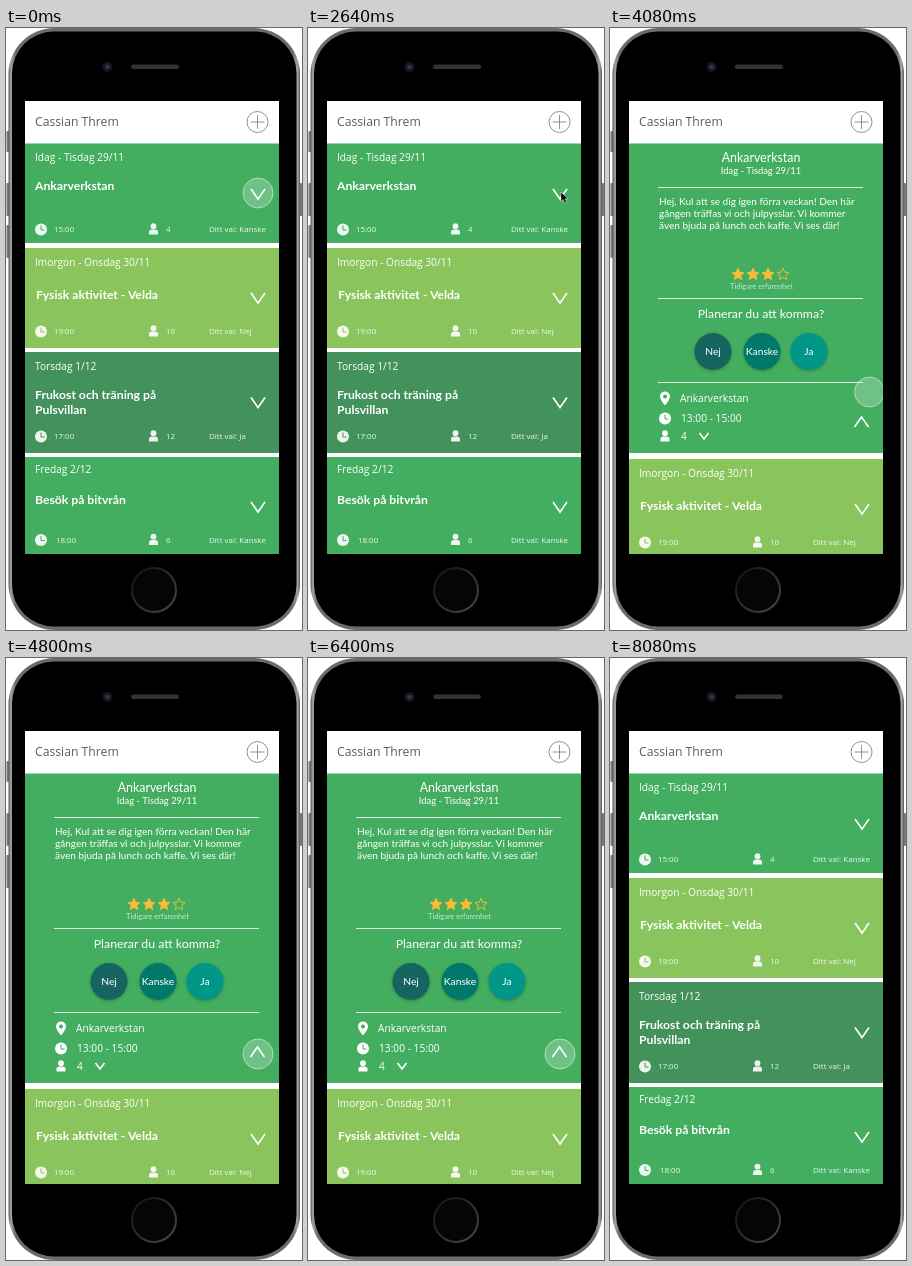
Recreate the animation shown at these times as an HTML page. Size 296 px wide and 602 px high, loop 8.24 s.

```html
<!DOCTYPE html>
<html lang="sv">
<head>
<meta charset="utf-8">
<style>
html, body { margin: 0; width: 100%; height: 100%; overflow: hidden; background: #fff }
svg { display: block; width: 296px; height: 602px }
text { fill: #fff; font-family: "Open Sans", sans-serif; white-space: pre }
.lato { font-family: Lato, sans-serif }
.bold { font-weight: 700 }
.mid { text-anchor: middle }
.line { fill: none; stroke: #fff }
.choice { filter: drop-shadow(0 1.5px 1.5px #0004) }
</style>
</head>
<body>
<svg viewBox="0 0 296 602">
  <defs>
    <clipPath id="screen"><rect x="19" y="73" width="254" height="453"/></clipPath>
    <linearGradient id="rim">
      <stop offset="0" stop-color="#55565b"/><stop offset=".008" stop-color="#a2a3a8"/>
      <stop offset=".025" stop-color="#6a6b70"/><stop offset=".975" stop-color="#6a6b70"/>
      <stop offset=".992" stop-color="#a2a3a8"/><stop offset="1" stop-color="#55565b"/>
    </linearGradient>
    <linearGradient id="ring" x2="1" y2="1">
      <stop offset="0" stop-color="#111"/><stop offset="1" stop-color="#4a4a4c"/>
    </linearGradient>
  </defs>
  <g fill="#77787d">
    <rect x=".5" y="103" width="3" height="21" rx="1"/>
    <rect x=".5" y="155" width="3" height="33" rx="1"/>
    <rect x=".5" y="197" width="3" height="33" rx="1"/>
    <rect x="293" y="155" width="3" height="33" rx="1"/>
  </g>
  <rect x="2.500" y="0" width="291.500" height="602" rx="46" fill="url(#rim)"/>
  <rect x="6" y="3.500" width="284.500" height="595" rx="42" fill="#000"/>
  <circle cx="101.500" cy="39" r="5" fill="#17171d"/>
  <circle cx="101.500" cy="39" r="2.300" fill="#30364f"/>
  <rect x="125" y="36.500" width="48" height="4.500" rx="2.250" fill="#333335"/>
  <circle cx="148" cy="562" r="22" fill="#050505" stroke="url(#ring)" stroke-width="2"/>
  <g clip-path="url(#screen)">
    <rect x="19" y="73" width="254" height="453" fill="#fff"/>
    <g id="cards"></g>
    <text x="29" y="98.300" font-size="12.200" style="fill:#5c5c5c">Cassian Threm</text>
    <g fill="none" stroke="#777" stroke-width=".8">
      <circle cx="251.500" cy="94" r="10.500"/>
      <path d="M244.500 94h14M251.500 87v14"/>
    </g>
    <circle id="touch" r="15" fill="#fff" fill-opacity=".24" stroke="#fff" stroke-opacity=".5"/>
    <path id="mouse" d="M253 164v9.500l2.200-2 1.700 3.500 1.800-.8-1.700-3.400h3z" fill="#000" stroke="#fff" stroke-width=".5"/>
  </g>
</svg>
<script>
const $ = id => document.getElementById(id);

const text = (x, y, size, str, cls = '', extra = '') =>
  `<text x="${x}" y="${y}" font-size="${size}" class="${cls}" ${extra}>${str}</text>`;
const chevron = (x, y, w = 7, h = 5) =>
  `<path class="line" stroke-width="1.6" d="M${x - w} ${y - h}L${x} ${y + h}L${x + w} ${y - h}"/>`;
const clock = (x, y, bg) =>
  `<circle cx="${x}" cy="${y}" r="6" fill="#fff"/><path d="M${x} ${y - 4}v4.5h3.5" fill="none" stroke="${bg}"/>`;
const person = (x, y) =>
  `<g fill="#fff"><circle cx="${x}" cy="${y - 2.8}" r="2.9"/>
   <path d="M${x - 4.5} ${y + 5.5}v-2.5q0-2.5 3-2.5h3q3 0 3 2.5v2.5z"/></g>`;
const rule = y => `<path class="line" stroke-opacity=".8" d="M48 ${y}H253"/>`;
const star = (x, y, fill) => {
  const pts = Array.from({length: 10}, (_, i) => {
    const a = i * Math.PI / 5, r = i % 2 ? 2.9 : 6.3;
    return [x + r * Math.sin(a), y - r * Math.cos(a)].map(v => v.toFixed(2));
  });
  return `<polygon points="${pts.join(' ')}" fill="${fill}" stroke="#fdbb36" stroke-width=".9"/>`;
};
const choice = (x, color, str) =>
  `<circle class="choice" cx="${x}" cy="323.5" r="18.5" fill="${color}"/>` + text(x, 327, 10.3, str, 'lato mid');

const cards = [
  {top: 115.5, h: 99.5, bg: '#43ae5f', date: 'Idag - Tisdag 29/11', dateY: 132.5, x: 29, title: ['Ankarverkstan'],
   titleY: 162, arrow: 166, foot: 201.5, time: '15:00', timeX: 48, n: 4, val: 'Kanske'},
  {top: 220, h: 100, bg: '#89c45d', date: 'Imorgon - Onsdag 30/11', dateY: 237.5, x: 30, title: ['Fysisk aktivitet - Velda'],
   titleY: 271, arrow: 270, foot: 303.5, time: '19:00', timeX: 48, n: 10, val: 'Nej'},
  {top: 324, h: 101, bg: '#44925b', date: 'Torsdag 1/12', dateY: 341.5, x: 29, title: ['Frukost och träning på', 'Pulsvillan'],
   titleY: 371, arrow: 374.5, foot: 408.5, time: '17:00', timeX: 48, n: 12, val: 'Ja'},
  {top: 429, h: 97, bg: '#43ae5f', date: 'Fredag 2/12', dateY: 444.5, x: 29, title: ['Besök på bitvrån'],
   titleY: 476, arrow: 479, foot: 512, time: '18:00', timeX: 50, n: 6, val: 'Kanske'}
];

const summary = c =>
  text(29, c.dateY, 10.2, c.date) +
  c.title.map((s, i) => text(c.x, c.titleY + i * 15, 12.2, s, 'lato bold')).join('') +
  chevron(252, c.arrow) + `<g opacity=".9">` +
  clock(35, c.foot, c.bg) + text(c.timeX, c.foot + 2.7, 7.9, c.time) +
  person(147.5, c.foot - .5) + text(160, c.foot + 2.7, 7.9, c.n) +
  text(203, c.foot + 2.7, 8, 'Ditt val: ' + c.val) + '</g>';

const details = () =>
  text(151, 133.5, 12.4, 'Ankarverkstan', 'lato mid') +
  text(151, 146, 9.4, 'Idag - Tisdag 29/11', 'lato mid') + rule(159.5) +
  ['Hej, Kul att se dig igen förra veckan! Den här',
   'gången träffas vi och julpysslar. Vi kommer',
   'även bjuda på lunch och kaffe. Vi ses där!']
    .map((s, i) => text(49, 176.5 + i * 12, 10.05, s, 'lato')).join('') +
  [128, 143, 158, 173].map((x, i) => star(x, 246.5, i < 3 ? '#fdbb36' : 'none')).join('') +
  text(151.5, 261, 7.5, 'Tidigare erfarenhet', 'lato mid', 'opacity=".7"') + rule(270.5) +
  text(151, 290, 12.3, 'Planerar du att komma?', 'lato mid') +
  choice(103, '#16645f', 'Nej') + choice(152, '#00796b', 'Kanske') + choice(199, '#009688', 'Ja') + rule(354.5) +
  `<path d="M55 377.5q-5-6-5-9a5 5 0 0 1 10 0q0 3-5 9zm0-11a2 2 0 1 0 .01 0z" fill="#fff" fill-rule="evenodd"/>` +
  text(70, 374, 10.2, 'Ankarverkstan') +
  clock(55, 390.5, '#43ae5f') + text(71, 394, 10.2, '13:00 - 15:00') +
  person(55, 408) + text(71, 411.5, 10.2, '4') + chevron(94, 408, 4.5, 3) + chevron(251.5, 394, 7, -5);

$('cards').innerHTML = cards.map((c, i) =>
  `<g id="card${i}"><rect id="back${i}" x="19" y="${c.top}" width="254" height="${c.h}" fill="${c.bg}"/>
   <g id="sum${i}">${summary(c)}</g></g>`).join('') + `<g id="details">${details()}</g>`;

const LOOP = 8240, STEP = 80, SHIFT = 211;
const clamp = v => Math.min(1, Math.max(0, v));
const easeOut = u => 1 - (1 - clamp(u)) ** 3;
const smooth = u => u * u * (3 - 2 * u);

// time, x, y of the finger
const path = [[0, 252, 165], [2640, 253.5, 165], [3440, 253.5, 165], [4080, 259.5, 364],
  [4720, 252, 396], [7080, 252, 396], [7480, 292, 400], [LOOP, 292, 400]];

function finger(t) {
  const i = path.findIndex(p => p[0] > t);
  const [t0, x0, y0] = path[i - 1], [t1, x1, y1] = path[i];
  const u = smooth((t - t0) / (t1 - t0));
  return [x0 + (x1 - x0) * u, y0 + (y1 - y0) * u];
}

function draw(t) {
  const open = easeOut((t - 2640) / 240) - easeOut((t - 6400) / 300);
  for (let i = 1; i < 4; i++) $('card' + i).setAttribute('transform', `translate(0 ${SHIFT * open})`);
  $('back0').setAttribute('height', cards[0].h + (SHIFT - 1) * open);
  $('sum0').setAttribute('opacity', clamp(1 - open));
  $('details').setAttribute('opacity', open < .02 ? 0 : open);

  const click = t >= 2640 && t < 2720;
  const [x, y] = finger(t);
  $('touch').setAttribute('transform', `translate(${x} ${y})`);
  $('touch').setAttribute('visibility', click || t > 7480 ? 'hidden' : 'visible');
  $('mouse').setAttribute('visibility', click ? 'visible' : 'hidden');
}

function tick() {
  draw(Math.floor(performance.now() % LOOP / STEP) * STEP);
  requestAnimationFrame(tick);
}
tick();
</script>
</body>
</html>
```
